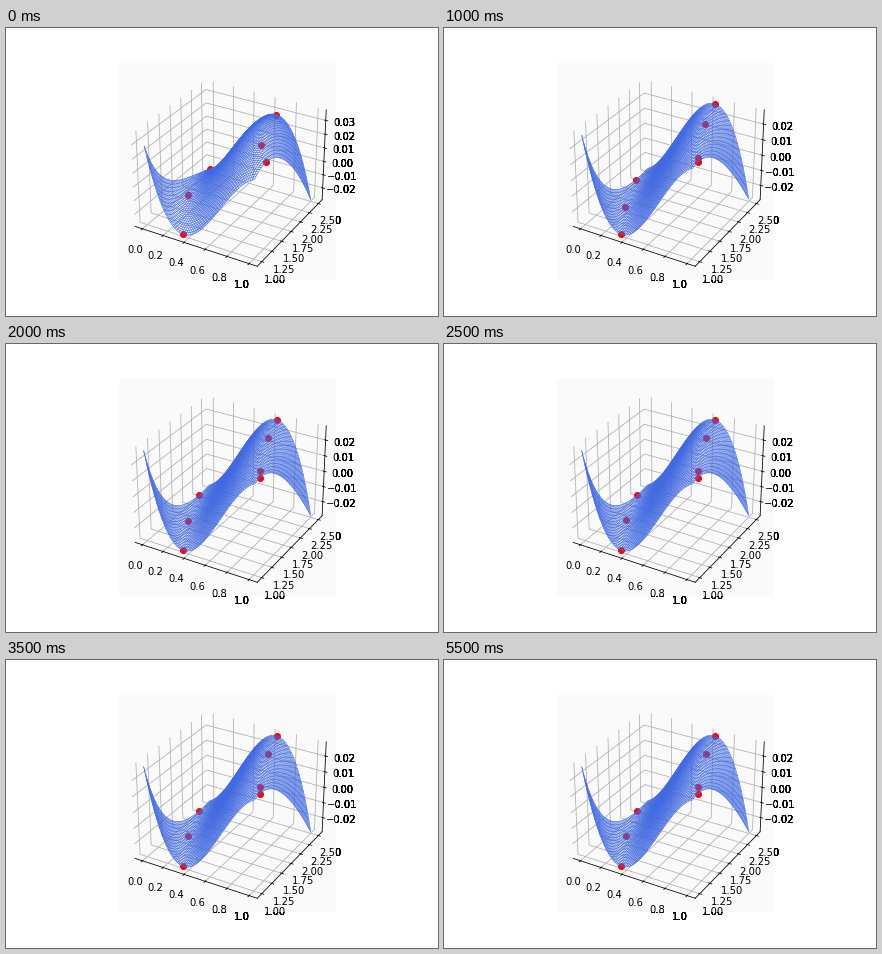
Animation, 432 px wide and 288 px high, one loop 7 s. Source, as a matplotlib script:

```python
import numpy as np
import matplotlib.pyplot as plt
from matplotlib.animation import FuncAnimation

FRAMES, STEP_MS = 14, 500
LAST_STEP = 11
AMP = 0.028                      # levelled error
SPAN = 1.405                     # range of x + SLOPE * ln(y)
SLOPE = (SPAN - 1) / np.log(2.5)

plt.rcParams.update({"font.family": "DejaVu Sans", "font.size": 10})
xs, ys = np.linspace(0, 1, 50), np.linspace(1, 2.5, 50)
X, Y = np.meshgrid(xs, ys)


def error(x, y, k):
    """Approximation error after k exchange steps."""
    t = 2 * (x + SLOPE * np.log(y)) / SPAN - 1
    base = -AMP * (4 * t**3 - 3 * t)
    if k == 0:
        return base + 0.0003 + 0.014 * (y - 1) * (2.5 - y)
    return base - 0.0003 + 0.0008 * (2 - y) * (-0.25) ** (k - 1)


def points(k):
    """Extremes on the four edges, others along the valley and the ridge."""
    dots = [(xs[error(xs, 1, k).argmin()], 1),
            (xs[error(xs, 2.5, k).argmax()], 2.5),
            (0, ys[error(0, ys, k).argmin()]),
            (1, ys[error(1, ys, k).argmax()])]
    swing = -0.06 * (-0.35) ** (k - 2) if k > 1 else 0
    inner = [(1, 1.6), (3, 1.5)] if k == 0 else [(1, 1.62), (3, 1.26), (3, 2.02)]
    for quarter, y in inner:
        y += swing
        dots.append((quarter * SPAN / 4 - SLOPE * np.log(y), y))
    return np.array(dots).T


def padded(lo, hi, margin=0.0):
    m = margin * (hi - lo)
    lo, hi = lo - m, hi + m
    pad = (hi - lo) / 48
    return lo - pad, hi + pad


def set_limits(ax, lo, hi):
    ax.set_xlim(*padded(0, 1, .05))
    ax.set_ylim(*padded(1, 2.5, .05))
    ax.set_zlim(*padded(lo, hi))


def make_axes(fig):
    ax = fig.add_axes([.125, .125, .775, .755], projection="3d",
                      facecolor="#fafafa")
    ax.set_xticks(np.arange(0, 1.01, .2))
    ax.set_yticks(np.arange(1, 2.51, .25))
    for axis in (ax.xaxis, ax.yaxis, ax.zaxis):
        axis.set_pane_color((1, 1, 1, 0))
    return ax


fig = plt.figure(figsize=(6, 4), dpi=72, facecolor="white")
# Stacked axes: labels outside the square build up, inside they are covered
stack = [make_axes(fig) for _ in range(6)]
top = stack[-1]
drawn = []


def update(i):
    k = min(i, LAST_STEP)
    while drawn:
        drawn.pop().remove()
    z = error(X, Y, k)
    lo, hi = z.min(), z.max()
    px, py = points(k)
    drawn.extend(top.plot(px, py, error(px, py, k), "ro", ms=6))
    drawn.append(top.plot_wireframe(X, Y, z, rcount=50, ccount=50,
                                    color="royalblue", linewidth=0.6))
    ticks = np.arange(np.ceil(lo * 100), np.floor(hi * 100) + 1) / 100
    for ax in stack:
        ax.set_zticks(ticks)
        set_limits(ax, lo, hi)
    return drawn


anim = FuncAnimation(fig, update, frames=FRAMES, interval=STEP_MS,
                     repeat=True, repeat_delay=0, blit=False)
plt.show()
```
